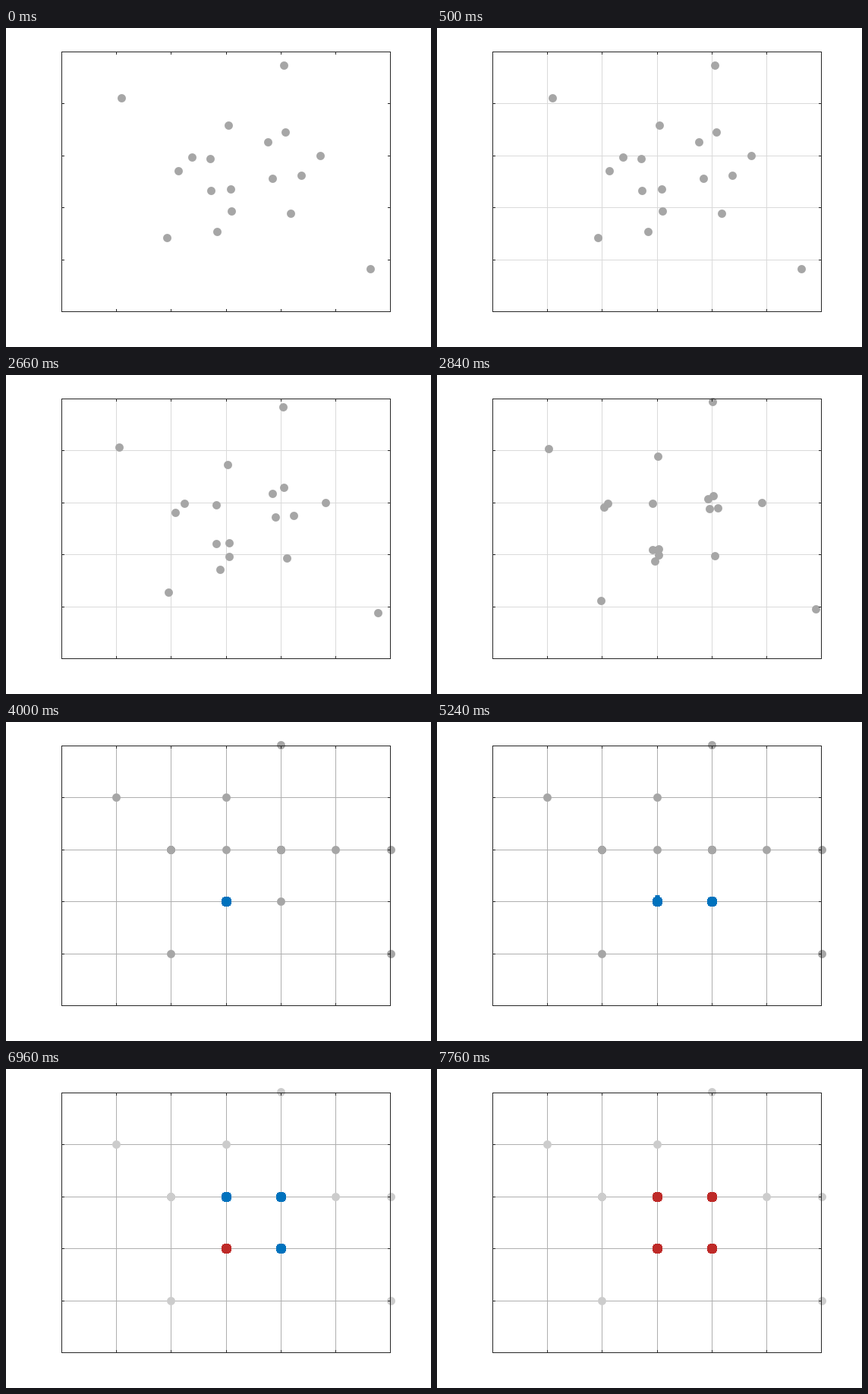
A matplotlib script for the animation above (8 s loop, 560 by 420 pixels).

```python
import numpy as np
import matplotlib.pyplot as plt
from matplotlib.animation import FuncAnimation

W, H, DPI = 560, 420, 100
STEP, LOOP = 20, 8000
PX = 72 / DPI  # points per pixel

INK, GRAY, PALE = "#262626", "#a6a6a6", "#cccccc"
BLUE, RED = "#0072bd", "#be2a28"
GRID_SOFT, GRID_FIRM = "#dadada", "#afafaf"

# Times in ms
GRID_ON, SLIDE, SLIDE_STEPS, SETTLED = 500, 2500, 25, 3000
SEED_ON, PROBE, PROBE_TICK, PROBE_TICKS = 4000, 5000, 30, 8
SIDE = PROBE_TICK * PROBE_TICKS
PROBE_END = PROBE + 4 * SIDE

# Lattice in pixels, y downwards
ORIGIN, PITCH = np.array([72.6, 30.4]), np.array([72.34, 68.6])
COLS, ROWS = 6, 5
LEFT, RIGHT, TOP, BOTTOM = 73, 506, 31, 373
TICK = 4

# Scattered samples
start = np.array([
    (366, 49), (152, 92), (293, 128), (368, 137), (345, 150), (245, 170),
    (269, 172), (414, 168), (227, 188), (351, 198), (389, 194), (270, 214),
    (296, 212), (297, 241), (375, 244), (278, 268), (212, 276), (480, 317),
])


def node(cells):
    """Pixel position of lattice cells (column, row)."""
    return np.rint(ORIGIN + PITCH * np.asarray(cells))


snapped = node(np.rint((start - ORIGIN) / PITCH))
settled = np.vstack([snapped, node((6, 2))])

# Lattice cell: (blue from, red from)
SEED = (3, 3)
CLUSTER = {
    SEED: (SEED_ON, 6960),
    (3, 2): (PROBE + 2 * SIDE, 7360),
    (4, 3): (PROBE + SIDE, 7660),
    (4, 2): (PROBE_END, 7760),
}

fig = plt.figure(figsize=(W / DPI, H / DPI), dpi=DPI, facecolor="white")
ax = fig.add_axes([0, 0, 1, 1])
ax.set_xlim(0, W)
ax.set_ylim(H, 0)
ax.axis("off")


def stroke(width, color, z, cap="butt", **style):
    return ax.plot([], [], color=color, lw=width * PX, solid_capstyle=cap,
                   snap=False, zorder=z, **style)[0]


def set_pieces(line, pieces):
    """Show separate straight pieces (x0, y0, x1, y1) with one line."""
    p = np.reshape(pieces, (-1, 4))
    gap = np.full(len(p), np.nan)
    line.set_data(np.column_stack([p[:, 0], p[:, 2], gap]).ravel(),
                  np.column_stack([p[:, 1], p[:, 3], gap]).ravel())


def set_dots(line, points):
    """Round caps on very short pieces give discs centred on pixels."""
    p = np.rint(np.reshape(points, (-1, 2))) + 0.5
    set_pieces(line, np.hstack([p - (0.005, 0), p + (0.005, 0)]))


grid_lines, frame = [], []
for y in (TOP + 0.5, BOTTOM + 0.5):
    frame.append((LEFT, y, RIGHT + 1, y))
for x in (LEFT + 0.5, RIGHT + 0.5):
    frame.append((x, TOP, x, BOTTOM + 1))
for c in range(1, COLS):
    x = node((c, 0))[0] + 0.5
    grid_lines.append((x, TOP, x, BOTTOM))
    frame += [(x, TOP, x, TOP + TICK), (x, BOTTOM + 1 - TICK, x, BOTTOM + 1)]
for r in range(1, ROWS):
    y = node((0, r))[1] + 0.5
    grid_lines.append((LEFT, y, RIGHT, y))
    frame += [(LEFT, y, LEFT + TICK, y), (RIGHT + 1 - TICK, y, RIGHT + 1, y)]

grid = stroke(1, GRID_SOFT, 1)
cloud = stroke(11, GRAY, 3, "round")
set_pieces(grid, grid_lines)
set_pieces(stroke(1, INK, 4), frame)
probe = stroke(6, BLUE, 5)
blue = stroke(13, BLUE, 6, "round", antialiased=False)
red = stroke(13, RED, 7, "round", antialiased=False)


def draw(i):
    t = i * STEP

    grid.set_visible(t >= GRID_ON)
    grid.set_color(GRID_FIRM if t >= SETTLED else GRID_SOFT)

    part = np.clip(((t - SLIDE) // STEP + 1) / SLIDE_STEPS, 0, 1)
    moving = start + (snapped - start) * part
    set_dots(cloud, settled if t >= SETTLED else moving)
    cloud.set_color(PALE if t >= PROBE_END else GRAY)

    set_dots(blue, [node(c) for c, (on, hit) in CLUSTER.items() if on <= t < hit])
    set_dots(red, [node(c) for c, (_, hit) in CLUSTER.items() if t >= hit])

    # A line grows towards each neighbour in turn, counter-clockwise
    probe.set_visible(PROBE <= t < PROBE_END)
    side, tick = divmod((t - PROBE) // PROBE_TICK, PROBE_TICKS)
    turn = side * np.pi / 2
    base = node(SEED) + 0.5
    reach = PITCH * (np.cos(turn), -np.sin(turn)) * (tick + 1) / PROBE_TICKS
    set_pieces(probe, [*base, *(base + reach)])
    return grid, cloud, probe, blue, red


anim = FuncAnimation(fig, draw, frames=LOOP // STEP, interval=STEP,
                     init_func=lambda: draw(0), repeat=True, repeat_delay=0)
plt.show()
```
